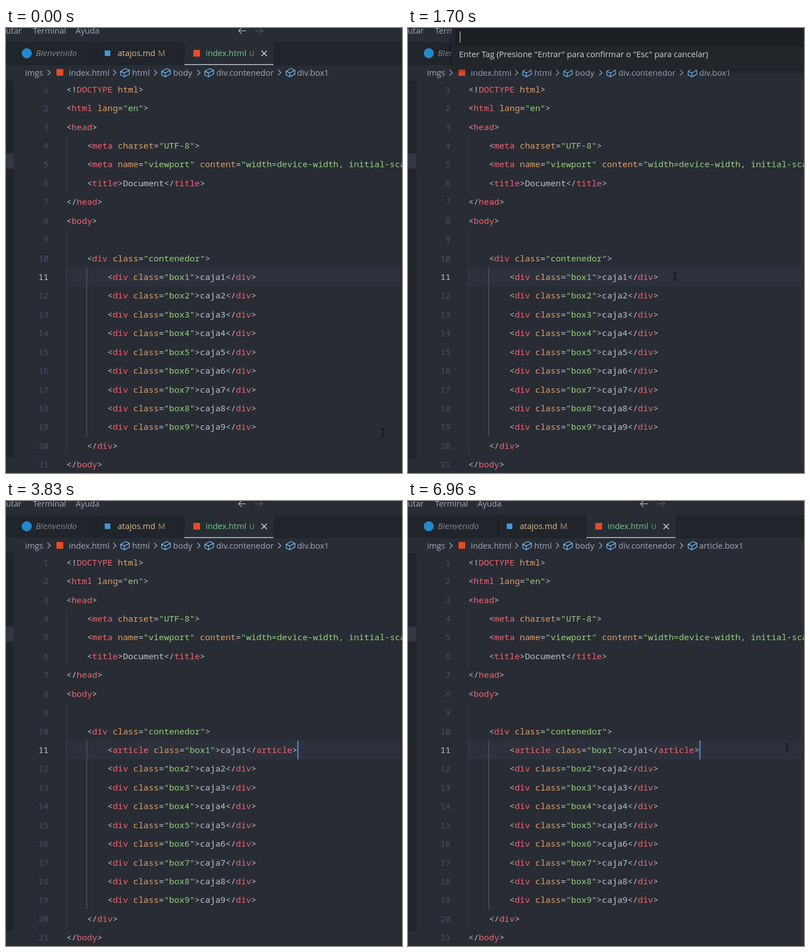
Animation, 706 px wide and 793 px high, one loop 7.01 s. Source, as an HTML page:

```html
<!DOCTYPE html>
<html lang="es">
<head>
<meta charset="UTF-8">
<title>Editor</title>
<style>
html, body { margin: 0; width: 100%; height: 100%; overflow: hidden; background: #282c34; }
svg { display: block; width: 706px; height: 793px; }
text { white-space: pre; font: 14.6px "Open Sans", "Noto Sans", sans-serif; fill: #a3abb9; }
.code text { font: 500 15.25px "Noto Sans Mono", "DejaVu Sans Mono", monospace; fill: #bcc2cd; }
.code .num { fill: #495162; text-anchor: end; }
.code .now { fill: #bcc2cd; }
.code .tag { fill: #f4636f; }
.code .attr { fill: #e0a066; }
.code .str { fill: #98d07c; }
</style>
</head>
<body>
<svg id="stage" viewBox="0 0 706 793"></svg>
<script>
const LOOP = 7010, OPEN = 1550, CLOSE = 3480, PITCH = 33.42, CHAR = 9.15;
const WORD = 'article';

const rect = (x, y, w, h, fill, more = '') =>
  `<rect x="${x}" y="${y}" width="${w}" height="${h}" fill="${fill}" ${more}/>`;
const line = (d, color, w = 1.2) =>
  `<path d="${d}" fill="none" stroke="${color}" stroke-width="${w}"/>`;
const label = (x, y, s, more = '') => `<text x="${x}" y="${y}" ${more}>${s}</text>`;
const span = (kind, s) => `<tspan class="${kind}">${s}</tspan>`;

// Syntax colours for one line of markup
const paint = src => src.replace(
  /(<[!\/]?)(\w+)|(\s(?:\w+(?==")|html(?=>)))|("[^"]*")/g,
  (m, open, tag, attr) => tag
    ? open.replace('<', '&lt;') + span('tag', tag)
    : span(attr ? 'attr' : 'str', m));

const box = (n, tag = 'div') => `<${tag} class="box${n}">caja${n}</${tag}>`;
const lines = [
  '<!DOCTYPE html>', '<html lang="en">', '<head>',
  '    <meta charset="UTF-8">',
  '    <meta name="viewport" content="width=device-width, initial-scale=1.0">',
  '    <title>Document</title>',
  '</head>', '<body>', '',
  '    <div class="contenedor">',
  ...[1, 2, 3, 4, 5, 6, 7, 8, 9].map(n => '        ' + box(n)),
  '    </div>', '</body>'
];

const codeLine = (src, i) => {
  const text = src.trimStart(), y = 114.8 + i * PITCH;
  const x = 107.8 + (src.length - text.length) * CHAR;
  return label(76, y, i + 1, `class="num${i === 10 ? ' now' : ''}"`) +
    label(x, y, paint(text), `id="line${i + 1}"`);
};

const chevron = x => line(`M${x - 3} 74.5l5 5l-5 5`, '#a3abb9', 1.3);
const cube = x =>
  line(`M${x - 7.5} 77l9-4.8l6.5 3.2v6.6l-9 5l-6.5-3.4zl6.5 3.2l9-4.8M${x - 1} 80.2v6.8`, '#6fb6f2', 1.4);

const menu =
  label(28, 9.5, 'Ejecutar', 'text-anchor="end"') + label(48, 9.5, 'Terminal') + label(124, 9.5, 'Ayuda') +
  line('M427.5 5h-13m5.5-5.5l-5.5 5.5l5.5 5.5', '#a3abb9', 1.3) +
  line('M444 5h14m-5.5-5.5l5.5 5.5l-5.5 5.5', '#505661', 1.3);

const tabs =
  rect(0, 25, 706, 41, '#20242b') + rect(318, 25, 159, 41, '#282c34') +
  rect(160, 25, 1, 41, '#191c21') + rect(317, 25, 1, 41, '#191c21') +
  rect(318, 64.5, 159, 1.5, '#c5cad3') +
  '<circle cx="37" cy="45" r="9" fill="#2489ca"/>' +
  label(53, 50, 'Bienvenido', 'style="font-style:italic;font-size:15.2px;fill:#828893"') +
  rect(176, 40, 10, 10, '#4296d8') +
  label(199, 50, 'atajos.md', 'style="fill:#dfbd89"') +
  label(271, 50, 'M', 'style="fill:#a99270"') +
  rect(334, 39, 12, 12, '#e44d26') +
  label(356, 50, 'index.html', 'style="fill:#73c991"') +
  label(433.5, 50, 'U', 'style="fill:#5da678;font-size:13px"') +
  line('M455.5 40.5l9.5 9.5m0-9.5l-9.5 9.5', '#d7dae0', 1.5);

const crumbs =
  label(34, 85, 'imgs') + rect(90, 73, 12, 12, '#e44d26') + label(112, 85, 'index.html') +
  label(225, 85, 'html') + label(298, 85, 'body') + label(375, 85, 'div.contenedor') +
  label(519, 85, 'div.box1', 'id="crumb"') +
  [77, 194, 267, 344, 488].map(chevron).join('') + [212, 285, 362, 507].map(cube).join('');

const editor =
  rect(0, 93, 14.5, 674, '#21252b') + rect(0, 223.5, 14.5, 27, '#323843') +
  rect(108, 426.5, 596, 34, '#2c313c') +
  line('M107.5 193V293M107.5 360V761', '#3b4049', 1) +
  line('M144 427V728', '#626772', 1) +
  `<g class="code">${lines.map(codeLine).join('')}</g>` +
  rect(0, 427, 1.7, 33.5, '#6a9bf5', 'id="caret"');

const prompt =
  '<g id="prompt">' +
  rect(78, -20, 660, 94, '#21252b', 'filter="url(#shade)"') +
  rect(85.5, -10, 660, 40.5, '#1c1f24', 'stroke="#15171b"') +
  label(92, 21, '', 'id="typed" style="fill:#c3c8d1"') +
  rect(0, 6, 1.2, 20, '#c3c8d1', 'id="mark"') +
  label(91, 52, 'Enter Tag (Presione "Entrar" para confirmar o "Esc" para cancelar)', 'style="fill:#cfd3da"') +
  '</g>';

const pointer = '<g id="pointer">' +
  line('M-3.5 -6.5h2.5l1 1l1-1h2.5M0 -5.5V5.5M-3.5 6.5h2.5l1-1l1 1h2.5', '#0c0d10', 1.2) + '</g>';

document.getElementById('stage').innerHTML =
  '<filter id="shade" x="-10%" y="-40%" width="120%" height="180%">' +
  '<feDropShadow dx="0" dy="2" stdDeviation="4" flood-color="#000" flood-opacity=".4"/></filter>' +
  rect(0, 0, 706, 793, '#282c34') + menu + tabs + crumbs + editor + prompt + pointer;

const el = id => document.getElementById(id);
const show = (node, on) => node.setAttribute('visibility', on ? 'inherit' : 'hidden');
const [row, crumb, caret, panel, typed, mark, mouse] =
  ['line11', 'crumb', 'caret', 'prompt', 'typed', 'mark', 'pointer'].map(el);

// Pointer stops: time, x, y
const path = [[0, 672, 721], [200, 672, 721], [950, 476, 443], [5700, 476, 443],
  [5870, 580, 424], [6390, 672, 438], [6960, 676, 439], [LOOP, 676, 439]];

function pointerAt(t) {
  const i = path.findIndex(p => p[0] > t);
  const [t0, x0, y0] = path[i - 1], [t1, x1, y1] = path[i];
  let k = (t - t0) / (t1 - t0);
  if (i === 2) k = k * k * (3 - 2 * k);
  return [x0 + (x1 - x0) * k, y0 + (y1 - y0) * k];
}

let tag = 'div';
function frame(now) {
  const t = now % LOOP, done = t >= CLOSE, open = t >= OPEN && !done;

  const next = done ? WORD : 'div';
  if (next !== tag) row.innerHTML = paint(box(1, tag = next));
  crumb.textContent = t < 4000 ? 'div.box1' : 'article.box1';

  const blink = done ? (t - CLOSE) % 1000 <= 500 : t % 1000 >= 500;
  caret.setAttribute('x', done ? 519.6 : 446);
  show(caret, !open && blink);

  show(panel, open);
  const count = Math.max(0, Math.min(WORD.length, Math.floor((t - 2150) / 130) + 1));
  typed.textContent = WORD.slice(0, count);
  mark.setAttribute('x', 92.3 + (count ? typed.getComputedTextLength() : 0));

  const [x, y] = pointerAt(t);
  mouse.setAttribute('transform', `translate(${x} ${y})`);
  show(mouse, t < 2300 || t >= 5700);
  requestAnimationFrame(() => frame(performance.now() - start));
}
const start = performance.now();
frame(0);
</script>
</body>
</html>
```
